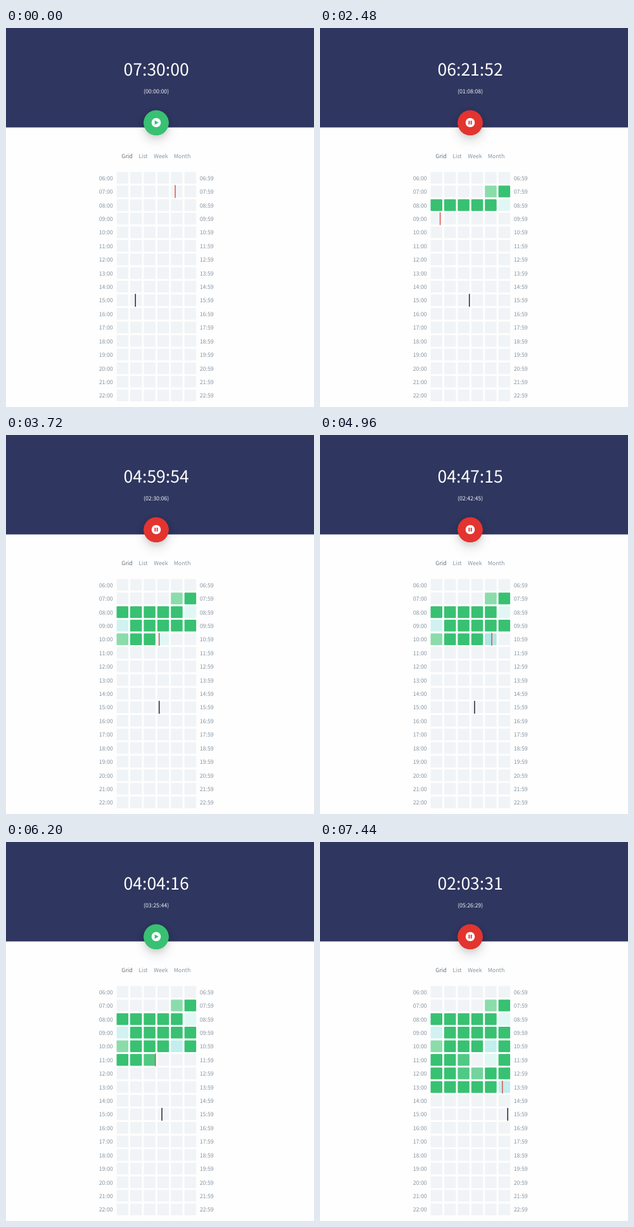
These frames come from a looping animation (486 by 597 pixels, 8 s). An HTML page with a canvas:

```html
<!DOCTYPE html>
<html lang="en">
<head>
<meta charset="utf-8">
<title>Work timer</title>
<style>
  html, body { margin: 0; width: 100%; height: 100%; overflow: hidden; background: #fefefe; }
  canvas { display: block; }
</style>
</head>
<body>
<canvas id="stage" width="486" height="597"></canvas>
<script>
const W = 486, H = 597, LOOP = 8000, HOLD = 1060, STEP = 20, SLOT = 1240;
const FAMILY = '"Noto Sans CJK SC", "Noto Sans CJK JP", "Noto Sans", sans-serif';
const GREEN = '#38c172', RED = '#e3342f', GREY = '#8795a1';
const GRID_X = 174.5, GRID_Y = 226.8, PITCH = 21.42, CELL = 18.5, CENTER = 237.1;

const SHADES = {
  '.': '#f1f4f6', G: GREEN, l: '#8bdcab', m: '#50c984', n: '#72d39c',
  a: '#e1f7f5', b: '#d1f2f1', c: '#c2eeed', d: '#b0e5e2'
};
// Worked ten-minute blocks, from 07:00 on
const LOG = '....lG' + 'GGGGGa' + 'bGGGGG' + 'lGGGcG' + 'GGm.aG' + 'GGmnGG' + 'GGGGGc';

// done: finished blocks, open: shade of the running block, now: [x, row], end: x in the 15:00 row
const STATES = [
  { left: '07:30:00', spent: '00:00:00', done: 0, open: '', now: [267, 1], end: 204.2, paused: true },
  { left: '07:03:16', spent: '00:26:44', done: 7, open: 'a', now: [197.9, 2], end: 204.2 },
  { left: '06:21:52', spent: '01:08:08', done: 12, open: '', now: [189.6, 3], end: 235.7 },
  { left: '04:59:54', spent: '02:30:06', done: 21, open: 'a', now: [241.7, 4], end: 241.7 },
  { left: '04:47:15', spent: '02:42:45', done: 22, open: 'd', now: [271.1, 4], end: 243.9 },
  { left: '04:04:16', spent: '03:25:44', done: 27, open: '', now: [235.8, 5], end: 246, paused: true },
  { left: '02:03:31', spent: '05:26:29', done: 42, open: '', now: [287.8, 7], end: 296.2 }
];

function text(g, str, x, y, color, size = 8.84, align = 'left', weight = 400) {
  g.font = `${weight} ${size}px ${FAMILY}`;
  g.textAlign = align;
  g.fillStyle = color;
  g.fillText(str, x, y);
}

function disc(g, x, y, r, color) {
  g.fillStyle = color;
  g.beginPath();
  g.arc(x, y, r, 0, 2 * Math.PI);
  g.fill();
}

function drawButton(g, paused) {
  const x = CENTER - 0.1, y = 149.3, color = paused ? GREEN : RED;
  for (const [offset, blur, alpha] of [[9.2, 18.5, 0.13], [3, 9.2, 0.1]]) {
    g.save();
    g.shadowColor = `rgba(0,0,0,${alpha})`;
    g.shadowOffsetY = offset;
    g.shadowBlur = blur;
    disc(g, x, y, 19.6, color);
    g.restore();
  }
  disc(g, x, y, 19.6, color);
  disc(g, x, y - 0.3, 7.3, '#fff');
  g.fillStyle = color;
  if (paused) {
    g.beginPath();
    g.moveTo(x - 2.4, y - 3.8);
    g.lineTo(x + 3.8, y - 0.3);
    g.lineTo(x - 2.4, y + 3.2);
    g.fill();
  } else {
    g.fillRect(x - 2.6, y - 3.3, 1.9, 6);
    g.fillRect(x + 0.7, y - 3.3, 1.9, 6);
  }
}

function drawGrid(g, blocks) {
  for (let row = 0; row < 17; row++) {
    const y = GRID_Y + row * PITCH, hour = String(row + 6).padStart(2, '0');
    text(g, hour + ':00', 168.7, y + 12.9, GREY, 8.84, 'right');
    text(g, hour + ':59', 305.7, y + 12.9, GREY);
    for (let col = 0; col < 6; col++) {
      g.fillStyle = SHADES[blocks[(row - 1) * 6 + col] || '.'];
      g.beginPath();
      g.roundRect(GRID_X + col * PITCH, y, CELL, CELL, 1.2);
      g.fill();
    }
  }
}

function drawMarker(g, x, row, color) {
  g.fillStyle = color;
  g.fillRect(x - 0.75, GRID_Y + row * PITCH - 0.8, 1.5, 20.2);
}

function render(state) {
  const canvas = document.createElement('canvas');
  canvas.width = W;
  canvas.height = H;
  const g = canvas.getContext('2d');
  g.textRendering = 'geometricPrecision';
  g.fillStyle = '#fefefe';
  g.fillRect(0, 0, W, H);
  g.fillStyle = '#2f365f';
  g.fillRect(0, 0, W, 156.6);
  text(g, state.left, CENTER, 75.2, '#fff', 26.5, 'center');
  text(g, `(${state.spent})`, CENTER, 102.8, '#f0f1f5', 8.84, 'center');
  drawButton(g, state.paused);
  text(g, 'Grid', 182.3, 205.4, '#606f7b', 8.84, 'left', 500);
  text(g, 'List', 209.2, 205.4, GREY);
  text(g, 'Week', 233.2, 205.4, GREY);
  text(g, 'Month', 264.7, 205.4, GREY);
  drawGrid(g, LOG.slice(0, state.done) + state.open);
  drawMarker(g, ...state.now, 'rgba(217,58,52,.85)');
  drawMarker(g, state.end, 9, '#22292f');
  return canvas;
}

const screens = STATES.map(render);
const stage = document.getElementById('stage').getContext('2d');

function tick() {
  const t = performance.now() % LOOP;
  const index = Math.floor(t / SLOT), since = t % SLOT - HOLD;
  stage.globalAlpha = 1;
  stage.drawImage(screens[index], 0, 0);
  if (since >= 0) {
    stage.globalAlpha = (Math.floor(since / STEP) + 1) / 10;
    stage.drawImage(screens[index + 1], 0, 0);
  }
  requestAnimationFrame(tick);
}
tick();
</script>
</body>
</html>
```
